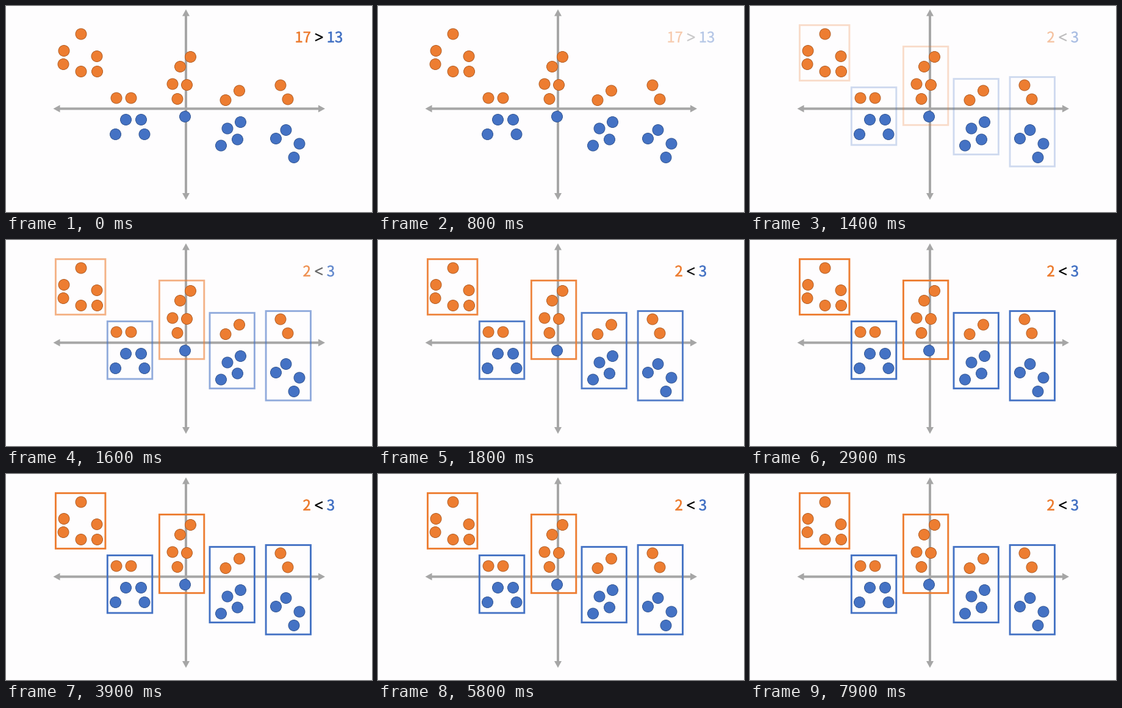
Animation, 600 px wide and 338 px high, one loop 8000 ms. Source, as a matplotlib script:

```python
import matplotlib.pyplot as plt
from matplotlib.animation import FuncAnimation
from matplotlib.patches import Circle, Polygon, Rectangle
from matplotlib.patheffects import withStroke

W, H, DPI = 600, 338, 100
STEP, FRAMES = 100, 80
PX = 72 / DPI
CX, CY = 295, 168.5
RADIUS, BOX_WIDTH, PAD = 9, 73.4, 13
FILL = {True: "#ed7d31", False: "#4472c4"}
EDGE = {True: "#ae5a21", False: "#2f528f"}
GRAY = "#a6a6a6"

# Each cluster: left, top and height of its box, then its dots.
CLUSTERS = [
    (81.4, 31.4, 91, [(123, 46), (95, 73.5), (94, 95.5), (149, 82.5),
                      (123, 107.5), (149.5, 107.5)]),
    (166.3, 133.5, 94.5, [(181, 151), (205, 151), (196.5, 186.5),
                          (221.5, 186.5), (179.5, 210.5), (227, 210.5)]),
    (251.4, 66.5, 128.8, [(302.5, 83.5), (285.5, 99.5), (273, 128),
                          (296.5, 129.5), (281, 152.5), (293.5, 181.5)]),
    (334, 119.6, 124, [(360, 154.5), (382.5, 139), (384.5, 190.5),
                       (363, 201), (379.5, 219), (352.5, 229)]),
    (426.1, 116.6, 146.6, [(450, 130), (462, 153), (459, 203.5),
                           (442.5, 217.5), (481, 226), (472, 248.5)]),
]

fig = plt.figure(figsize=(W / DPI, H / DPI), dpi=DPI, facecolor="#fefdfe")
ax = fig.add_axes([0, 0, 1, 1])
ax.set_xlim(0, W)
ax.set_ylim(H, 0)
ax.axis("off")


def is_above(dot):
    return dot[1] < CY


def half_axis(dx, dy, reach, length=11, half=6):
    """Arrow from the crossing point in direction (dx, dy)."""
    tip_x, tip_y = CX + dx * reach, CY + dy * reach
    bx, by = tip_x - dx * length, tip_y - dy * length
    ax.plot([CX, bx + dx], [CY, by + dy], color=GRAY, lw=4 * PX,
            solid_capstyle="butt", snap=False, zorder=1)
    head = [(tip_x, tip_y), (bx - dy * half, by + dx * half),
            (bx + dy * half, by - dx * half)]
    ax.add_patch(Polygon(head, fc=GRAY, lw=0, zorder=1))


def draw_dot(dot):
    up = is_above(dot)
    ax.add_patch(Circle(dot, RADIUS, fc=FILL[up], ec=EDGE[up],
                        lw=0.9 * PX, zorder=3))


def draw_box(left, top, height, dots, color):
    xs = [x for x, _ in dots]
    width = max(BOX_WIDTH, max(xs) - min(xs) + 2 * PAD)
    box = Rectangle((left, top), width, height, fill=False, ec=color,
                    lw=2.9 * PX, joinstyle="miter", snap=False, zorder=2)
    return ax.add_patch(box)


def number(value, up, x, ha):
    color = FILL[up]
    return ax.text(x, 59.6, str(value), color=color, ha=ha, va="baseline",
                   family="Noto Sans CJK JP", fontsize=23.8 * PX, zorder=4,
                   path_effects=[withStroke(linewidth=0.5 * PX,
                                            foreground=color)])


def comparison(above, below):
    """The two counts with the chevron that fits them."""
    sign = 1 if above > below else -1
    xs = [513 + 6 * sign * d for d in (-1, 1, -1)]
    chevron, = ax.plot(xs, [45.6, 51.3, 57], color="black", lw=2.2 * PX,
                       solid_capstyle="butt", solid_joinstyle="miter",
                       zorder=4)
    return [number(above, True, 499.8, "right"),
            number(below, False, 525.8, "left"), chevron]


for dx, dy, reach in ((-1, 0, 217.5), (1, 0, 228), (0, -1, 163), (0, 1, 149.5)):
    half_axis(dx, dy, reach)

boxes, dot_sides, box_sides = [], [], []
for left, top, height, dots in CLUSTERS:
    sides = [is_above(d) for d in dots]
    majority = sum(sides) > len(sides) / 2
    dot_sides += sides
    box_sides.append(majority)
    boxes.append(draw_box(left, top, height, dots, FILL[majority]))
    for dot in dots:
        draw_dot(dot)

dot_count = comparison(dot_sides.count(True), dot_sides.count(False))
box_count = comparison(box_sides.count(True), box_sides.count(False))


def ramp(t, start, length):
    return min(1, max(0, (t - start) / length))


def update(i):
    t = i * STEP
    fade_out = 1 - ramp(t, 420, 480)
    fade_in = ramp(t, 1250, 600)
    for group, alpha in ((dot_count, fade_out), (box_count + boxes, fade_in)):
        for item in group:
            item.set_alpha(alpha)
            item.set_visible(alpha > 0)
    return dot_count + box_count + boxes


anim = FuncAnimation(fig, update, frames=FRAMES, interval=STEP,
                     repeat=True, repeat_delay=0, blit=False)
plt.show()
```
